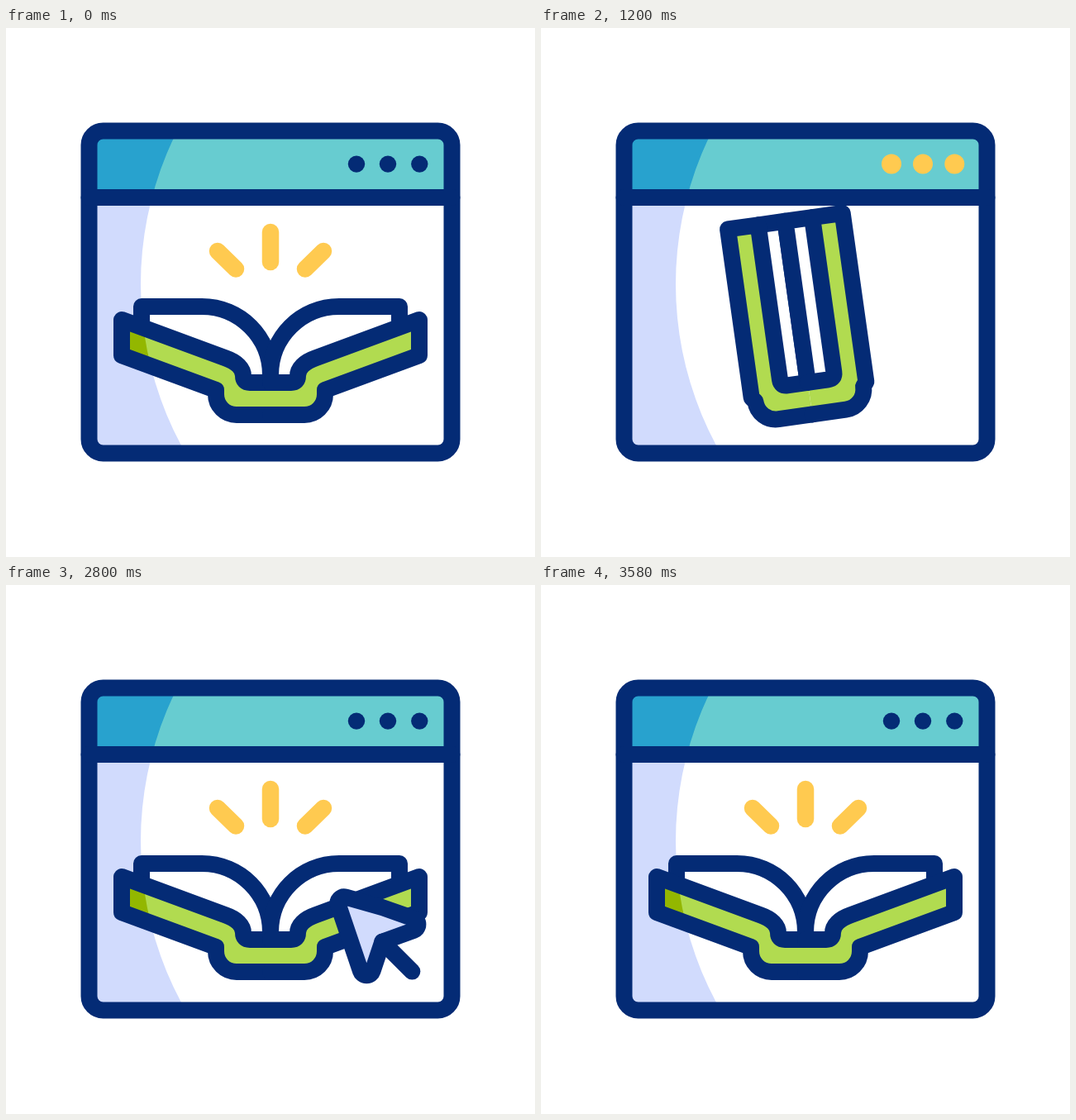
Recreate the animation shown at these times as an HTML page with a canvas. Size 640x640 px, loop 3.6 s.

```html
<!DOCTYPE html>
<html lang="en">
<head>
<meta charset="utf-8">
<title>Online book</title>
<style>
  html, body { margin: 0; width: 100%; height: 100%; overflow: hidden; background: #fff; }
  canvas { display: block; width: 640px; height: 640px; }
</style>
</head>
<body>
<canvas id="stage" width="640" height="640"></canvas>
<script>
const ctx = document.getElementById('stage').getContext('2d');
const LOOP = 3600;
const NAVY = '#042b75', TEAL = '#67ccd0', BLUE = '#28a2ce', LAVENDER = '#d1dbfd';
const GREEN = '#b1db50', DARK_GREEN = '#93b700', YELLOW = '#ffca50';
const HINGE = [300, 430];

const mix = (a, b, k) => a + (b - a) * k;

function ease(t, from, to) {
  const p = Math.min(1, Math.max(0, (t - from) / (to - from)));
  return p * p * (3 - 2 * p);
}

// Eased value through [time, value] keys.
function track(t, keys) {
  let value = keys[0][1];
  for (let i = 1; i < keys.length; i++) {
    value += (keys[i][1] - keys[i - 1][1]) * ease(t, keys[i - 1][0], keys[i][0]);
  }
  return value;
}

// Moves a point along an arc around the book's hinge.
function swing(closed, open, k) {
  const polar = ([x, y]) => {
    const dx = x - HINGE[0], dy = y - HINGE[1];
    return [Math.hypot(dx, dy), Math.atan2(dy, dx)];
  };
  const [r0, a0] = polar(closed), [r1, a1] = polar(open);
  const r = mix(r0, r1, k), a = mix(a0, a1, k);
  return [HINGE[0] + r * Math.cos(a), HINGE[1] + r * Math.sin(a)];
}

function stroke(path, color = NAVY) {
  ctx.strokeStyle = color;
  ctx.stroke(path);
}

function fill(path, color) {
  ctx.fillStyle = color;
  ctx.fill(path);
}

function line(x1, y1, x2, y2, color) {
  const path = new Path2D();
  path.moveTo(x1, y1);
  path.lineTo(x2, y2);
  stroke(path, color);
}

function circle(x, y, r) {
  const path = new Path2D();
  path.arc(x, y, r, 0, 2 * Math.PI);
  return path;
}

const frame = new Path2D();
frame.roundRect(100.5, 124.5, 439, 390, 17);

// Everything left of the big lit circle.
const shade = new Path2D();
shade.rect(0, -200, 640, 1100);
shade.addPath(circle(575, 310, 412));

function drawWindow(yellowDots) {
  fill(frame, '#fff');
  ctx.save();
  ctx.clip(frame);
  ctx.fillStyle = TEAL;
  ctx.fillRect(100, 124, 440, 81);
  ctx.save();
  ctx.clip(shade, 'evenodd');
  ctx.fillStyle = BLUE;
  ctx.fillRect(100, 124, 200, 81);
  ctx.fillStyle = LAVENDER;
  ctx.fillRect(100, 205, 200, 310);
  ctx.restore();
  ctx.restore();
  stroke(frame);
  line(100.5, 205, 539.5, 205, NAVY);
  for (const x of [424, 462, 500.3]) {
    fill(circle(x, 164.6, yellowDots ? 12 : 10.2), yellowDots ? YELLOW : NAVY);
  }
}

// Left half of the book; the right half is its mirror image.
function bookHalf(k) {
  const innerTip = swing([287, 232], [140, 353], k);
  const outerTip = swing([250, 232], [140, 396], k);
  const innerBend = swing([287, 390], [266, 399.5], k);
  const outerEnd = [mix(250, 254, k), 438];
  const pageStart = swing([287, 240], [164, 355], k);
  const pageCorner = swing([287, 232], [164, 337], k);
  const pageTop = swing([320, 232], [237, 337], k);
  const curve1 = swing([320, 295], [283, 337], k);
  const curve2 = swing([320, 358], [320, 374], k);

  const edge = path => {
    path.lineTo(...innerBend);
    path.bezierCurveTo(mix(287, 279, k), mix(400, 404, k), 287, mix(410, 412, k), 287, 421);
    path.quadraticCurveTo(287, 429, 295, 429);
    path.lineTo(320, 429);
  };
  const spine = path => {
    path.lineTo(254, 443);
    path.bezierCurveTo(254, 457, 265, 468, 279, 468);
    path.lineTo(320, 468);
  };

  const page = new Path2D();
  page.moveTo(...pageStart);
  page.lineTo(...pageCorner);
  page.lineTo(...pageTop);
  page.bezierCurveTo(...curve1, ...curve2, 320, 420);
  page.lineTo(320, 429);

  const paper = new Path2D();
  paper.moveTo(...innerTip);
  edge(paper);
  paper.lineTo(320, 420);
  paper.bezierCurveTo(...curve2, ...curve1, ...pageTop);
  paper.lineTo(...pageCorner);
  paper.lineTo(...pageStart);
  paper.closePath();

  const cover = new Path2D();
  cover.moveTo(320, 468);
  cover.lineTo(279, 468);
  cover.bezierCurveTo(265, 468, 254, 457, 254, 443);
  cover.lineTo(...outerEnd);
  cover.lineTo(...outerTip);
  cover.lineTo(...innerTip);
  edge(cover);

  const outline = new Path2D();
  outline.moveTo(320, 429);
  outline.lineTo(295, 429);
  outline.quadraticCurveTo(287, 429, 287, 421);
  outline.bezierCurveTo(287, mix(410, 412, k), mix(287, 279, k), mix(400, 404, k), ...innerBend);
  outline.lineTo(...innerTip);
  outline.lineTo(...outerTip);
  outline.lineTo(...outerEnd);
  spine(outline);
  return { page, paper, cover, outline };
}

function drawBook(k, angle, drop) {
  const half = bookHalf(k);
  ctx.save();
  ctx.translate(320, 409);
  ctx.rotate(angle * Math.PI / 180);
  ctx.translate(-320, -409);
  for (const side of [1, -1]) {
    ctx.save();
    if (side < 0) {
      ctx.translate(640, 0);
      ctx.scale(-1, 1);
    }
    fill(half.paper, '#fff');
    fill(half.cover, GREEN);
    if (side > 0 && k > 0.3) {
      // The cover's shading stays put while the window drops.
      ctx.save();
      ctx.clip(half.cover);
      ctx.translate(0, -drop);
      ctx.clip(shade, 'evenodd');
      ctx.fillStyle = DARK_GREEN;
      ctx.fillRect(100, 100, 160, 500);
      ctx.restore();
    }
    stroke(half.page);
    stroke(half.outline);
    ctx.restore();
  }
  ctx.restore();
}

function drawRays(k) {
  if (k <= 0.01) return;
  ctx.lineWidth = 20.5 * Math.min(1, k * 3);
  line(320, 283, 320, mix(283, 247, k), YELLOW);
  line(278, 291.5, mix(278, 256, k), mix(291.5, 270, k), YELLOW);
  line(362, 291.5, mix(362, 384, k), mix(291.5, 270, k), YELLOW);
  ctx.lineWidth = 20;
}

const arrow = new Path2D();
arrow.moveTo(454, 389.5);
arrow.arcTo(512, 410, 454, 431, 7.6);
arrow.lineTo(454, 431);
arrow.arcTo(435, 488, 396, 373, 7.6);
arrow.arcTo(396, 373, 454, 389.5, 7.6);
arrow.closePath();

function drawCursor(reach) {
  ctx.save();
  ctx.translate(mix(265, -92, reach), mix(150.5, -52.5, reach));
  fill(arrow, LAVENDER);
  stroke(arrow);
  line(454, 431, 490, 467, NAVY);
  ctx.restore();
}

function draw(t) {
  const openness = track(t, [[0, 1], [400, 0], [2400, 0], [2800, 1]]);
  const rays = track(t, [[0, 1], [200, 0], [2600, 0], [2800, 1]]);
  const sway = track(t, [[400, 0], [600, 8], [800, -8], [1000, 8], [1200, -8], [1400, 0]]);
  const drop = track(t, [[3000, 0], [3200, 61.5], [3580, 0]]);
  const reach = track(t, [[1600, 0], [2400, 1], [2600, 1], [3200, 0]]);

  ctx.fillStyle = '#fff';
  ctx.fillRect(0, 0, 640, 640);
  ctx.lineWidth = 20;
  ctx.lineCap = ctx.lineJoin = 'round';
  ctx.save();
  ctx.translate(0, drop);
  drawWindow(t >= 20 && t < 1600);
  drawRays(rays);
  drawBook(openness, sway, drop);
  ctx.restore();
  if (reach > 0) drawCursor(reach);
}

const start = performance.now();
function tick() {
  draw((performance.now() - start) % LOOP);
  requestAnimationFrame(tick);
}
tick();
</script>
</body>
</html>
```
